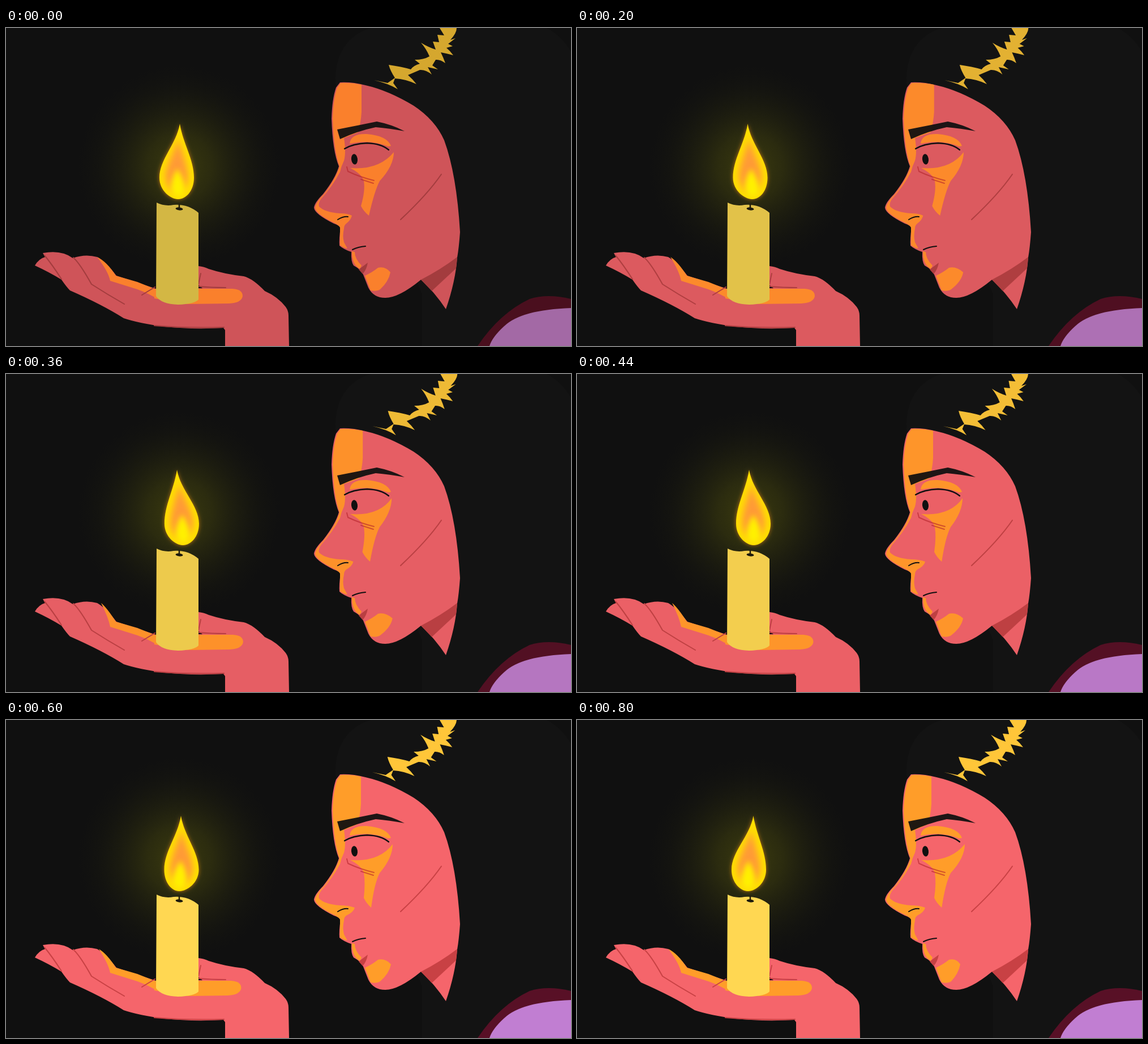
An HTML page with a canvas that plays this animation: 998x561 px, repeating every 840 ms.

```html
<!DOCTYPE html>
<html lang="en">
<head>
<meta charset="utf-8">
<title>Candlelight</title>
<style>
  html, body { margin: 0; width: 100%; height: 100%; overflow: hidden; background: #101010; }
  canvas { display: block; }
</style>
</head>
<body>
<canvas id="stage" width="998" height="561"></canvas>
<script>
const ctx = document.getElementById('stage').getContext('2d');
const LOOP = 840, STEP = 40;

// Positions of the swaying parts at these moments, joined by smooth curves.
const TIMES = [0, 120, 280, 440, 600, 720, 800];
const TRACKS = {
  tip:      [307, 303, 301, 304, 309, 311, 311.5],
  belly:    [301.5, 303.5, 308.5, 311.5, 310, 306, 303.5],
  base:     [304, 307, 311.5, 312, 306, 303, 302],
  forehead: [628, 630, 631, 629, 627, 626, 626],
  cheek:    [685, 684, 682, 681, 683, 684.5, 685],
  nose:     [611, 611, 612, 615, 616, 616, 615],
  chin:     [679, 681, 683, 682, 680, 678, 677],
  palm:     [418, 419.5, 420, 417.5, 415.5, 415, 415],
  finger:   [161, 163, 167, 168, 164, 162, 161.5],
  hairTop:  [0, 1, 1.5, 1, 0, -1.5, -2],
  hairLow:  [0, 0, -2, -3.5, -3.5, -2.5, -2]
};

function sample(values, t) {
  const last = TIMES.length - 1;
  let i = 0;
  while (i < last - 1 && t >= TIMES[i + 1]) i++;
  const slope = n => {
    const a = Math.max(n - 1, 0), b = Math.min(n + 1, last);
    return (values[b] - values[a]) / (TIMES[b] - TIMES[a]);
  };
  const span = TIMES[i + 1] - TIMES[i];
  const u = (t - TIMES[i]) / span, v = 1 - u;
  return values[i] * (1 + 2 * u) * v * v + values[i + 1] * u * u * (3 - 2 * u)
    + span * u * v * (v * slope(i) - u * slope(i + 1));
}

// Each colour brightens from its first to its second value.
const COLOURS = {
  skin:   [[207, 84, 89], [245, 101, 107]],
  shade:  [[163, 60, 62], [200, 65, 68]],
  light:  [[250, 128, 44], [255, 157, 41]],
  wax:    [[211, 183, 68], [255, 215, 82]],
  gold:   [[213, 167, 46], [255, 198, 57]],
  maroon: [[74, 15, 30], [88, 16, 38]],
  purple: [[163, 105, 165], [193, 126, 210]]
};

const mix = ([a, b], k) => `rgb(${a.map((v, i) => Math.round(v + (b[i] - v) * k))})`;

function fill(path, colour) {
  ctx.fillStyle = colour;
  ctx.fill(new Path2D(path));
}

function line(path, colour, width = 2) {
  ctx.strokeStyle = colour;
  ctx.lineWidth = width;
  ctx.stroke(new Path2D(path));
}

function ellipse(x, y, rx, ry, turn, colour) {
  ctx.fillStyle = colour;
  ctx.beginPath();
  ctx.ellipse(x, y, rx, ry, turn, 0, Math.PI * 2);
  ctx.fill();
}

const INK = '#111010';
const HAIR = 'M582 98C580 48 602 12 645 0H955Q982 14 998 42V561H735V470Z';
const STREAK = `M650 92L674 97L687 88Q679 76 676 65Q698 68 715 73Q720 66 731 63
  L722 56Q738 56 748 50Q742 36 733 26Q746 34 759 38L754 24L765 25L762 12L774 13L766 0
  H796Q796 9 785 21L794 18L781 28L789 32L778 35Q784 40 790 48Q779 45 768 43
  Q772 51 776 62Q767 55 759 56L753 66L763 73L745 69L752 82Q741 73 731 74L710 83
  Q718 90 725 99Q706 90 687 89L684 97L692 108Q676 98 650 92Z`;
const FACE = `M590 96Q612 95 635 101Q675 110 720 137Q758 162 774 198Q796 258 802 360
  Q800 388 797 405Q794 447 777 496Q757 466 733 444Q694 476 670 476Q649 476 640 458L631 435
  Q627 426 614 419Q609 412 610 395Q597 391 589 384Q588 372 591 352Q588 348 579 345
  Q545 328 544 317Q545 308 560 293Q582 265 588 244Q577 218 575 160Q576 125 583 105Z`;
const HAND = `M51 419Q58 407 69 404L65 397Q98 391 118 406Q140 398 161 404Q177 413 195 437
  L265 460H340V420Q350 421 358 425Q385 434 420 438Q436 442 457 464Q480 474 494 492
  Q499 499 499 507L500 561H387V533L384 529Q330 532 280 527Q235 521 208 512
  Q170 488 113 463Q107 457 98 444Q77 431 51 419Z`;
const CANDLE = `M266 308Q280 315 296 312Q321 310 340 326V479Q333 487 304 488Q274 487 265 473Z`;

function drawGlow() {
  const glow = ctx.createRadialGradient(306, 245, 10, 306, 245, 180);
  glow.addColorStop(0, 'rgba(112,112,12,.42)');
  glow.addColorStop(.28, 'rgba(96,96,14,.34)');
  glow.addColorStop(.55, 'rgba(75,75,14,.2)');
  glow.addColorStop(.8, 'rgba(55,55,14,.08)');
  glow.addColorStop(1, 'rgba(40,40,14,0)');
  ctx.fillStyle = glow;
  ctx.fillRect(120, 60, 380, 380);
}

function drawHand(c, p) {
  fill(HAND, c.skin);
  fill(`M${p.finger} 404Q178 412 194 437L232 448L267 462V478Q254 469 232 461
    L184 446Q181 430 ${p.finger} 404Z`, c.light);
  fill(`M262 460H${p.palm - 18}Q${p.palm} 461 ${p.palm} 473Q${p.palm - 2} 485 ${p.palm - 24} 486
    L320 487L262 477Z`, c.light);
  fill('M339 453L347 459H339Z', INK);
  line('M68 401Q82 418 98 443', c.shade);
  line('M119 405Q131 416 151 452Q179 470 209 487', c.shade);
  line('M240 471L263 457', c.shade);
  line('M340 452L344 433M341 456Q362 458 388 458', c.shade);
  line('M262 525Q320 530 385 528', c.shade);
}

function drawCandle(c) {
  fill(CANDLE, c.wax);
  line('M306 311V319', '#241f0c', 2.5);
  ellipse(306, 319, 6.5, 2.6, .1, '#1c190c');
}

function drawFlame({ tip, belly, base }) {
  const left = belly - 30.5, right = belly + 30.5;
  const shape = new Path2D(`M${tip} 169C${tip - 6} 205 ${left} 232 ${left} 264
    C${left} 287 ${base - 13} 302 ${base} 302C${base + 14} 302 ${right} 287 ${right} 264
    C${right} 232 ${tip + 6} 205 ${tip} 169Z`);
  ctx.save();
  ctx.shadowColor = 'rgba(255,150,20,.65)';
  ctx.shadowBlur = 7;
  ctx.fillStyle = '#ffdf00';
  ctx.fill(shape);
  ctx.restore();

  ctx.save();
  ctx.clip(shape);
  ctx.filter = 'blur(6px)';
  const mid = (tip + belly) / 2;
  fill(`M${mid} 192C${mid - 4} 215 ${belly - 21} 242 ${belly - 20} 265
    Q${belly - 16} 288 ${base} 293Q${belly + 16} 288 ${belly + 20} 265
    C${belly + 21} 242 ${mid + 4} 215 ${mid} 192Z`, '#ff9a36');
  ctx.filter = 'blur(5px)';
  const core = (belly + base) / 2;
  fill(`M${core} 248Q${core - 13} 268 ${base - 13} 286Q${base - 8} 299 ${base} 299
    Q${base + 10} 299 ${base + 13} 286Q${core + 13} 268 ${core} 248Z`, '#fff000');
  ctx.restore();
}

function drawFace(c, p) {
  const noseShift = p.nose - 611;
  fill(FACE, c.skin);
  fill('M733 444Q768 426 797 404L795 424L752 464Z', c.shade);

  // Candlelight along the profile
  fill(`M591 97Q610 96 ${p.forehead} 100V148Q${p.forehead - 1} 166 ${p.forehead - 6} 184L597 194
    Q601 220 597 234Q592 244 590 254Q576 280 556 302Q551 310 553 315Q563 325 590 327
    Q604 327 ${p.nose} 331Q${p.nose - 2} 339 601 345Q597 348 597 354
    Q594 367 597 378L603 389Q596 388 590 383V352Q588 348 580 344Q547 328 546 317
    Q547 308 562 293Q583 266 589 244Q579 218 577 160Q578 125 585 105Z`, c.light);
  fill('M611 394L616 395Q616 407 628 419L625 425Q611 418 611 394Z', c.light);
  fill(`M634 437Q647 431 657 423Q670 420 ${p.chin} 431Q${p.chin - 3} 447 661 461
    Q655 465 644 463Z`, c.light);
  fill('M607 204Q609 186 637 187Q673 190 680 208L675 209Q644 196 607 204Z', c.light);
  fill(`M608 247Q659 251 ${p.cheek} 219Q${p.cheek} 243 660 270Q651 287 ${641 + noseShift * .8} 331
    Q${632 + noseShift} 324 ${627 + noseShift} 314Q635 286 632 270Q628 257 608 247Z`, c.light);

  fill('M623 426L639 414Q637 426 630 434Z', c.shade);
  line('M769 258Q745 293 697 338', c.shade);
  line('M602 245L604 253Q625 263 650 269M627 267L649 274', 'rgba(180,35,42,.6)');

  ctx.globalAlpha = .94;
  fill('M585 179Q621 172 655 165Q681 170 704 182Q677 177 653 175Q620 182 590 196Z', INK);
  ctx.globalAlpha = 1;
  line('M598 213Q613 204 638 203Q663 204 676 215', INK, 2.3);
  ellipse(615.5, 231.5, 5.5, 9.3, -.12, INK);
  line('M586 338Q596 332 604 333', INK);
  line('M612 391Q622 386 635 385', INK);
}

function drawStreak(c, { hairTop, hairLow }) {
  ctx.save();
  ctx.transform(1, 0, (hairLow - hairTop) / 100, 1, hairTop, 0);
  fill(STREAK, c.gold);
  ctx.restore();
}

function drawShoulder(c) {
  fill('M833 561Q872 503 925 478Q956 468 998 478V561Z', c.maroon);
  fill('M854 561Q859 545 880 526Q910 497 998 494V561Z', c.purple);
}

function render(t) {
  const c = {}, p = {};
  for (const name in COLOURS) c[name] = mix(COLOURS[name], Math.min(t / 600, 1));
  for (const name in TRACKS) p[name] = sample(TRACKS[name], t);
  ctx.fillStyle = '#101010';
  ctx.fillRect(0, 0, 998, 561);
  ctx.lineCap = ctx.lineJoin = 'round';
  drawGlow();
  fill(HAIR, '#131313');
  drawHand(c, p);
  drawCandle(c);
  drawFlame(p);
  drawFace(c, p);
  drawStreak(c, p);
  drawShoulder(c);
}

const start = performance.now();
function tick() {
  const elapsed = (performance.now() - start) % LOOP;
  render(Math.floor(elapsed / STEP) * STEP);
  requestAnimationFrame(tick);
}
tick();
</script>
</body>
</html>
```
